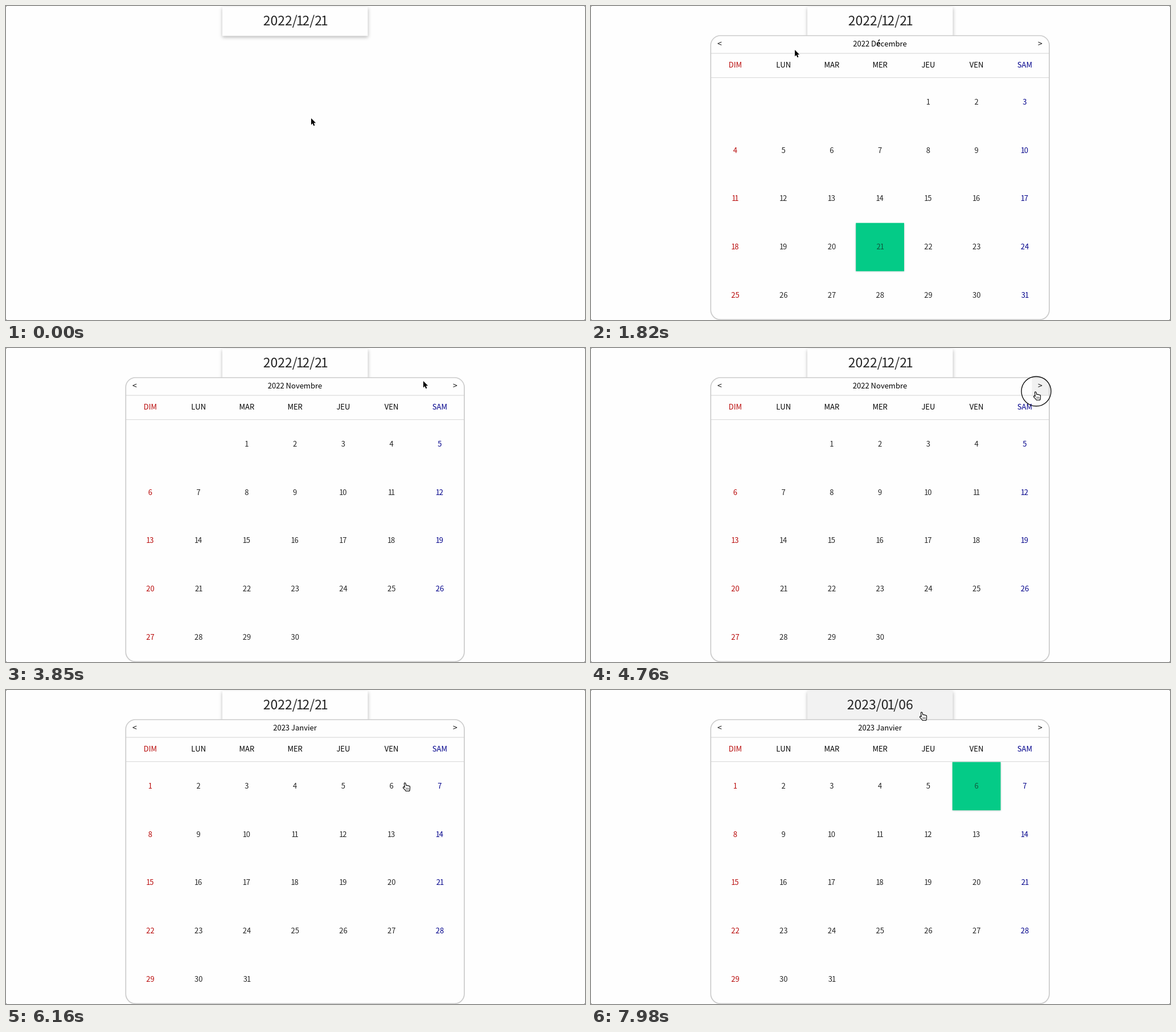
An HTML page with a canvas for the animation above (8 s loop, 1017 by 551 pixels).

```html
<!DOCTYPE html>
<html lang="fr">
<head>
<meta charset="utf-8">
<title>Calendrier</title>
<style>
html, body { margin: 0; width: 100%; height: 100%; overflow: hidden; background: #fefefe; }
canvas { display: block; }
</style>
</head>
<body>
<canvas id="stage" width="1017" height="551"></canvas>
<script>
const ctx = document.getElementById('stage').getContext('2d');
const LOOP = 8000, STEP = 70, CELL = 84.75, LEFT = 211, TOP = 126.4;
const FONT = '"Noto Sans CJK KR", "Noto Sans CJK JP", "Noto Sans CJK SC", "Noto Sans CJK", "Noto Sans", sans-serif';
const DAYS = ['DIM', 'LUN', 'MAR', 'MER', 'JEU', 'VEN', 'SAM'];
const MONTHS = { 0: 'Janvier', 10: 'Novembre', 11: 'Décembre' };
const CLICKS = [840, 2660, 4760, 5320, 6370, 7770];
const RELEASE = 140;

// pointer path: time, x, y
const PATH = [
  [0, 536, 197], [70, 536, 197], [490, 582, 22], [1330, 582, 22],
  [1820, 358, 77], [2170, 239, 70], [2380, 235.5, 68], [3220, 235.5, 68],
  [3500, 480, 46], [3850, 733, 58], [4060, 762, 65], [4480, 782, 76],
  [5880, 782, 76], [6160, 702, 162], [6300, 691, 168], [7000, 691, 168],
  [7700, 582, 38], [8000, 582, 38]
];

const ARROW = new Path2D('M0 0V11.4L2.6 9L4.4 13.3L6.4 12.5L4.6 8.3H8.2Z');
const HAND = new Path2D('M-1.6 9L-2.6 2Q-1.5 .2 -.2 1.8L.8 5.6Q2.2 4.6 3 6Q4.6 5.2 5.3 6.6Q7 6 7.5 7.8V11Q7.4 13 6.5 15.2H.3Q-1 12.8 -3.9 10.4Q-5 8.6 -3.4 8Q-2.4 8 -1.6 9Z');
const CREASES = new Path2D('M1 9.5V13M3 9.5V13M5 9.5V13');

function slope(i, axis) {
  const a = PATH[i - 1], p = PATH[i], b = PATH[i + 1];
  const still = q => !q || (q[1] === p[1] && q[2] === p[2]);
  return still(a) || still(b) ? 0 : (b[axis] - a[axis]) / (b[0] - a[0]);
}

function pointerAt(t) {
  const i = Math.max(0, PATH.findIndex(p => p[0] > t) - 1);
  const a = PATH[i], b = PATH[i + 1], span = b[0] - a[0], u = (t - a[0]) / span;
  return [1, 2].map(k =>
    a[k] + (b[k] - a[k]) * u * u * (3 - 2 * u) +
    span * u * (1 - u) * (slope(i, k) * (1 - u) - slope(i + 1, k) * u));
}

// centred text with narrow figure ones
function text(str, cx, baseline, size, color) {
  const font = c => (ctx.font = `${c === 'é' ? 'bold ' : ''}${size}px ${FONT}`);
  const trim = c => (c === '1' ? size * 0.09 : 0);
  const advance = c => (font(c), ctx.measureText(c).width - 2 * trim(c));
  const chars = [...str];
  let x = cx - chars.reduce((sum, c) => sum + advance(c), 0) / 2;
  ctx.fillStyle = color;
  for (const c of chars) {
    font(c);
    ctx.fillText(c, x - trim(c), baseline);
    x += advance(c);
  }
}

function rect(x, y, w, h, color) {
  ctx.fillStyle = color;
  ctx.fillRect(x, y, w, h);
}

function shadowRect(x, y, w, h, color, blur, dy, alpha) {
  ctx.save();
  ctx.shadowColor = `rgba(0,0,0,${alpha})`;
  ctx.shadowBlur = blur;
  ctx.shadowOffsetY = dy;
  rect(x, y, w, h, color);
  ctx.restore();
}

function dayColor(col, plain) {
  return col === 0 ? '#b80808' : col === 6 ? '#00008b' : plain;
}

function arrowButton(x, w, hover, press) {
  if (!hover) return;
  const mix = [[241, 99], [241, 187], [241, 248]].map(([a, b]) => a + (b - a) * press);
  rect(x, 52, w, 31, `rgb(${mix})`);
}

function calendar(month, picked, hover, press) {
  const year = month.getFullYear(), m = month.getMonth();
  ctx.save();
  ctx.beginPath();
  ctx.roundRect(210.3, 52, 594.7, 498.3, 17);
  ctx.fillStyle = '#fefefe';
  ctx.fill();
  ctx.save();
  ctx.clip();
  arrowButton(210, 31, hover === 'prev', press);
  arrowButton(774.5, 31, hover === 'next', press);
  rect(211, 82.5, 594, 1.2, '#dcdcdc');
  rect(211, 125, 594, 1.2, '#dcdcdc');
  ctx.restore();
  ctx.strokeStyle = '#cbcbcb';
  ctx.lineWidth = 1.7;
  ctx.stroke();
  ctx.restore();

  text('<', 226, 71, 14, '#111');
  text('>', 789, 71, 14, '#111');
  text(`${year} ${MONTHS[m]}`, 507.5, 71, 13, '#000');
  DAYS.forEach((d, i) => text(d, LEFT + (i + 0.5) * CELL, 108, 13, dayColor(i, '#000')));

  const first = month.getDay(), count = new Date(year, m + 1, 0).getDate();
  for (let day = 1; day <= count; day++) {
    const slot = first + day - 1, col = slot % 7, row = Math.floor(slot / 7);
    const x = LEFT + col * CELL, y = TOP + row * CELL;
    const on = +new Date(year, m, day) === +picked;
    if (on) shadowRect(x, y, CELL, CELL, '#04cb87', 3, 1, 0.25);
    text(String(day), x + CELL / 2, y + 46.5, 13, on ? '#12573c' : dayColor(col, '#222'));
  }
}

function hitTest(x, y, open) {
  if (x > 380 && x < 636 && y < 52) return 'date';
  if (!open || x < 211 || x > 805) return '';
  if (y > 52 && y < 83) return x < 241 ? 'prev' : x > 775 ? 'next' : '';
  return y > TOP ? 'cell' : '';
}

function pointer(x, y, hand) {
  ctx.save();
  ctx.translate(x, y);
  ctx.lineJoin = 'round';
  ctx.lineWidth = hand ? 1.1 : 1.8;
  ctx.strokeStyle = hand ? '#111' : '#fff';
  ctx.fillStyle = hand ? '#fff' : '#000';
  const shape = hand ? HAND : ARROW;
  ctx.stroke(shape);
  ctx.fill(shape);
  if (hand) {
    ctx.stroke(shape);
    ctx.lineWidth = 0.7;
    ctx.stroke(CREASES);
  }
  ctx.restore();
}

function draw(t) {
  const [x, y] = pointerAt(t);
  const open = (t >= 980 && t < 6510) || t >= 7910;
  const chosen = t >= 6510;
  const picked = chosen ? new Date(2023, 0, 6) : new Date(2022, 11, 21);
  const month = new Date(2022, t < 2800 ? 11 : t < 4900 ? 10 : t < 5460 ? 11 : 12, 1);
  const hover = hitTest(x, y, open);
  const since = t - (CLICKS.filter(c => c <= t).pop() ?? -LOOP);
  const press = since < STEP ? 0 : Math.max(0, Math.min(1, 1 - (since - RELEASE) / 260));

  rect(0, 0, 1017, 551, '#fefefe');
  shadowRect(380, 1.5, 255.5, 51, hover === 'date' ? '#f2f2f2' : '#fefefe', 6, 2, 0.27);
  text(chosen ? '2023/01/06' : '2022/12/21', 507.7, 34, 23, '#222');
  if (open) calendar(month, picked, hover, press);

  for (const cx of [0, 1016]) for (const cy of [0, 550]) rect(cx, cy, 1, 1, '#555');

  if (since < RELEASE) {
    ctx.beginPath();
    ctx.arc(x, y, 26, 0, 7);
    ctx.strokeStyle = '#111';
    ctx.lineWidth = 1.4;
    ctx.stroke();
  }
  pointer(x, y, hover !== '');
}

function frame(now) {
  const t = now % LOOP;
  draw(Math.floor(t / STEP) * STEP);
  requestAnimationFrame(frame);
}
requestAnimationFrame(frame);
</script>
</body>
</html>
```
